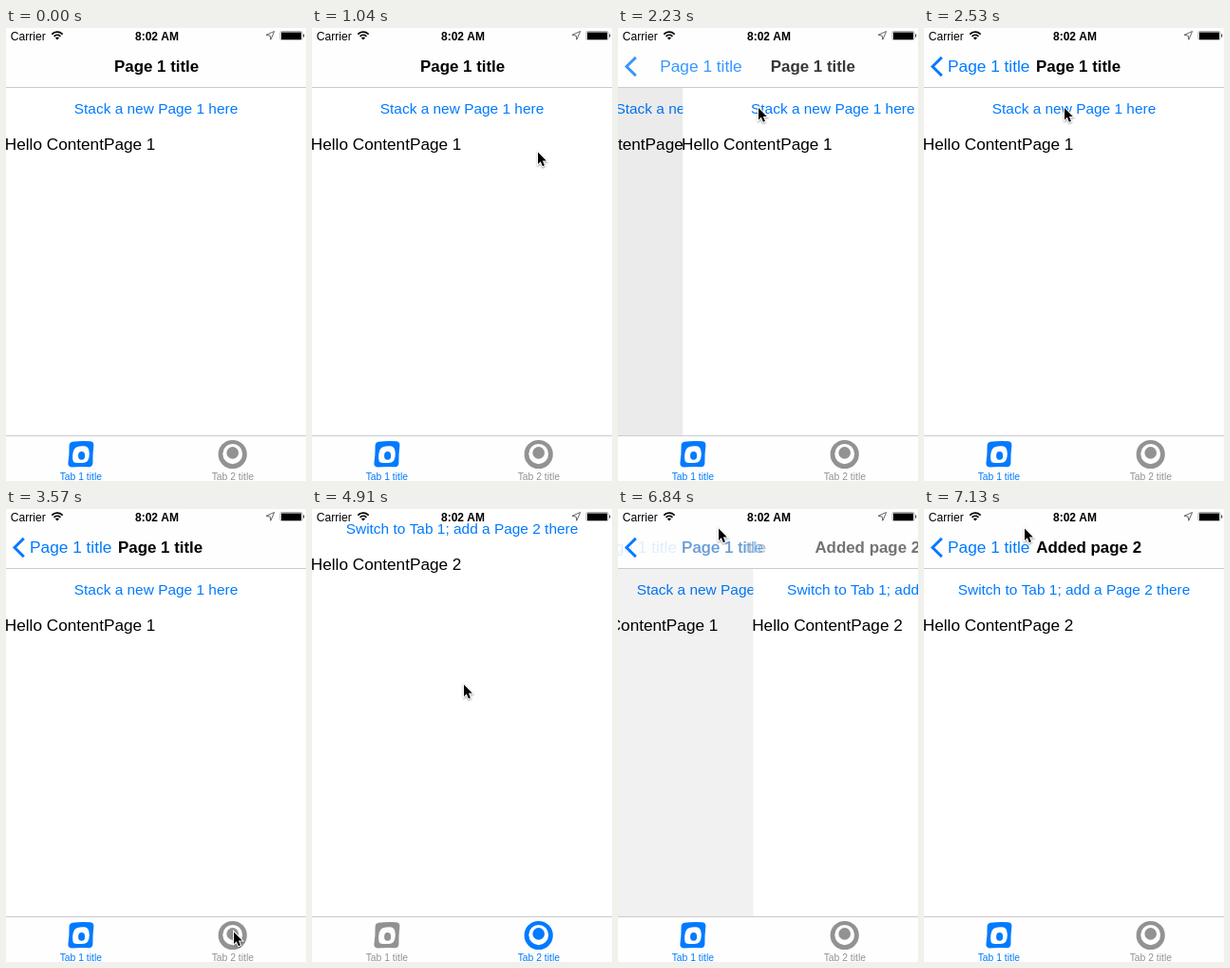
Write an HTML page with a canvas that moves like this. It is 316x476 px and loops after 8 s.

```html
<!DOCTYPE html>
<html lang="en">
<head>
<meta charset="utf-8">
<title>Stacked pages and tabs</title>
<style>
  html, body { margin: 0; width: 100%; height: 100%; overflow: hidden; background: #fff; }
  canvas { display: block; width: 316px; height: 476px; }
</style>
</head>
<body>
<canvas id="stage" width="316" height="476"></canvas>
<script>
const W = 316, H = 476, LOOP = 8000;
const NAV_BOTTOM = 62, TAB_TOP = 428;
const BLUE = '#007aff', GRAY = '#929292', LINE = '#cbcbcb', BAR = '#fefefe';
const FONT = '"Liberation Sans", Arial, sans-serif';

// The screen refreshes at a coarse, even rate; moments below are counted in ticks.
const FIRST_TICK = 745, TICK = 148.3;

const ROOT = { title: 'Page 1 title', titleX: 114, link: 'Stack a new Page 1 here', body: 'Hello ContentPage 1' };
const STACKED = { ...ROOT, titleX: 118, back: true };
const ADDED = { title: 'Added page 2', titleX: 118.3, back: true,
  link: 'Switch to Tab 1; add a Page 2 there', body: 'Hello ContentPage 2' };

// [tick, x, y]
const CURSOR = [
  [0, 268, 147], [1, 238, 130], [2, 197, 108], [3, 161, 89], [4, 148, 83.5],
  [12, 148, 83.5], [13, 148, 88], [14, 148, 111], [15, 147, 147.5],
  [16, 166, 227], [17, 202, 331], [18, 232, 419], [19, 240, 444],
  [24, 240, 444], [25, 236, 427], [28, 160, 184], [31, 119, 63],
  [32, 112, 42], [33, 108, 28], [34, 106, 21], [35, 106, 20]
];

const ctx = document.getElementById('stage').getContext('2d');
const clamp = v => Math.max(0, Math.min(1, v));
const mix = (a, b, p) => a + (b - a) * p;

// Progress of a push that starts at the given tick.
const pushProgress = (tick, start) => {
  const p = 1 - (1 - clamp((tick - start) / 3)) ** 3;
  return p > 0.99 ? 1 : p;
};

function text(str, x, y, size, { color = '#000', weight = 'normal', align = 'left', alpha = 1 } = {}) {
  ctx.save();
  ctx.globalAlpha *= alpha;
  ctx.font = `${weight} ${size}px ${FONT}`;
  ctx.textAlign = align;
  ctx.fillStyle = color;
  ctx.fillText(str, x, y);
  ctx.restore();
}

function rect(x, y, w, h, color) {
  ctx.fillStyle = color;
  ctx.fillRect(x, y, w, h);
}

function disc(x, y, rx, ry, color) {
  ctx.beginPath();
  ctx.ellipse(x, y, rx, ry, 0, 0, Math.PI * 2);
  ctx.fillStyle = color;
  ctx.fill();
}

function shape(d, fill, stroke, width = 1) {
  const path = new Path2D(d);
  if (stroke) {
    ctx.strokeStyle = stroke;
    ctx.lineWidth = width;
    ctx.stroke(path);
  }
  if (fill) {
    ctx.fillStyle = fill;
    ctx.fill(path);
  }
}

function drawStatusBar() {
  text('Carrier', 4.7, 12.6, 12.1);
  text('8:02 AM', 159, 12.6, 12, { weight: 'bold', align: 'center' });

  ctx.lineWidth = 1.8;
  ctx.strokeStyle = '#000';
  for (const r of [4.6, 7.8]) {
    ctx.beginPath();
    ctx.arc(54, 12, r, -Math.PI * 0.76, -Math.PI * 0.24);
    ctx.stroke();
  }
  shape('M54 12.6L51.9 10.3Q54 8.6 56.1 10.3Z', '#000');

  shape('M282.6 3.5L278.8 12.3L278.2 8.1L274 7.3Z', null, '#666', 1);
  ctx.beginPath();
  ctx.roundRect(289, 3.5, 23, 9, 1.5);
  ctx.strokeStyle = '#aaa';
  ctx.lineWidth = 1;
  ctx.stroke();
  rect(290, 4.5, 21, 7.5, '#000');
  rect(313, 6.5, 1.2, 3, '#444');
}

function drawContent(page, x, top, linkAlpha = 1) {
  text(page.link, x + W / 2, top + 26.6, 15.45, { color: BLUE, align: 'center', alpha: linkAlpha });
  text(page.body, x - 1.2, top + 65, 17.2);
}

function drawBackLabel(x, alpha) {
  text('Page 1 title', x, 46, 17.3, { color: BLUE, alpha });
}

function drawTitle(page, x, alpha) {
  text(page.title, x, 46, 16.9, { weight: 'bold', alpha });
}

function drawChevron(alpha) {
  ctx.save();
  ctx.globalAlpha = alpha;
  shape('M18.8 30.9L9 40.5L18.8 50.1', null, BLUE, 2.9);
  ctx.restore();
}

function drawNavigation(from, to, p, linkAlpha) {
  ctx.save();
  ctx.beginPath();
  ctx.rect(0, NAV_BOTTOM, W, TAB_TOP - NAV_BOTTOM);
  ctx.clip();
  if (p < 1) {
    drawContent(from, -W * 0.3 * p, NAV_BOTTOM + 1, linkAlpha);
    rect(0, NAV_BOTTOM, W, H, `rgba(0,0,0,${0.1 * p})`);
  }
  if (p > 0) {
    const x = W * (1 - p);
    rect(x, NAV_BOTTOM, W, H, '#fff');
    drawContent(to, x, NAV_BOTTOM + 1);
  }
  ctx.restore();

  rect(0, 0, W, NAV_BOTTOM, BAR);
  rect(0, NAV_BOTTOM, W, 1, LINE);
  const labelX = mix(from.titleX, 25, p);
  if (p < 1) {
    drawTitle(from, labelX, clamp(1 - p * 1.4));
    if (from.back) drawBackLabel(25 - 90 * p, clamp(1 - p * 1.6));
  }
  if (p > 0) {
    drawTitle(to, mix(W, to.titleX, p), p);
    drawBackLabel(labelX, p);
  }
  drawChevron(from.back ? 1 : p);
}

function drawTabBar(active) {
  const first = active === 1 ? BLUE : GRAY;
  const second = active === 2 ? BLUE : GRAY;
  rect(0, TAB_TOP, W, H - TAB_TOP, BAR);
  rect(0, TAB_TOP, W, 1, LINE);

  shape('M70 434.8Q79 433.4 89 434.2Q92.6 434.8 92.4 438.5Q91.2 448 91.4 457.5Q91 461 87.5 461.2' +
        'Q78 460.6 69 461.4Q65.4 461.2 65.4 457.5Q66.8 448 66.6 438.5Q67 435.2 70 434.8Z', first);
  shape('M74 440.4Q79 438.8 84 439.4Q87.6 440.4 87.8 447.5Q87.6 455 83.5 456.6' +
        'Q77 457.6 72 456.6Q69.8 455.6 70.2 449Q70.8 442 74 440.4Z', BAR);
  disc(79.6, 449.4, 3.5, 4.4, first);

  disc(238.7, 448, 15.1, 15.1, second);
  disc(238.7, 447.6, 10.4, 10.6, BAR);
  disc(238.7, 446.4, 6.3, 6.3, second);

  text('Tab 1 title', 78.8, 475, 10.35, { color: first, align: 'center' });
  text('Tab 2 title', 238.8, 475, 10.35, { color: second, align: 'center' });
}

function drawCursor(tick) {
  if (tick < 0) return;
  let next = CURSOR.findIndex(key => key[0] > tick);
  if (next < 0) next = CURSOR.length - 1;
  const [t0, x0, y0] = CURSOR[next - 1], [t1, x1, y1] = CURSOR[next];
  const p = clamp((tick - t0) / (t1 - t0));

  ctx.save();
  ctx.translate(mix(x0, x1, p), mix(y0, y1, p));
  const arrow = 'M0 0.5V13L2.8 10.3L4.9 15.2L6.9 14.3L4.9 9.6H8.8Z';
  ctx.shadowColor = 'rgba(0,0,0,0.4)';
  ctx.shadowBlur = 2;
  ctx.shadowOffsetY = 1;
  shape(arrow, null, '#fff', 2);
  ctx.shadowColor = 'transparent';
  shape(arrow, '#000');
  ctx.restore();
}

function draw(time) {
  const tick = Math.floor((time - FIRST_TICK) / TICK);
  const onSecondTab = tick >= 24 && tick < 41;
  rect(0, 0, W, H, '#fff');

  if (onSecondTab) {
    drawContent(ADDED, 0, -1, tick >= 39 ? 0.2 : 1);
  } else if (tick < 24) {
    drawNavigation(ROOT, STACKED, pushProgress(tick, 8.8), tick === 8 ? 0.2 : 1);
  } else {
    drawNavigation(STACKED, ADDED, pushProgress(tick, 40.3), 1);
  }
  drawStatusBar();
  drawTabBar(onSecondTab ? 2 : 1);
  drawCursor(tick);
}

const start = performance.now();
function loop() {
  draw((performance.now() - start) % LOOP);
  requestAnimationFrame(loop);
}
loop();
</script>
</body>
</html>
```
